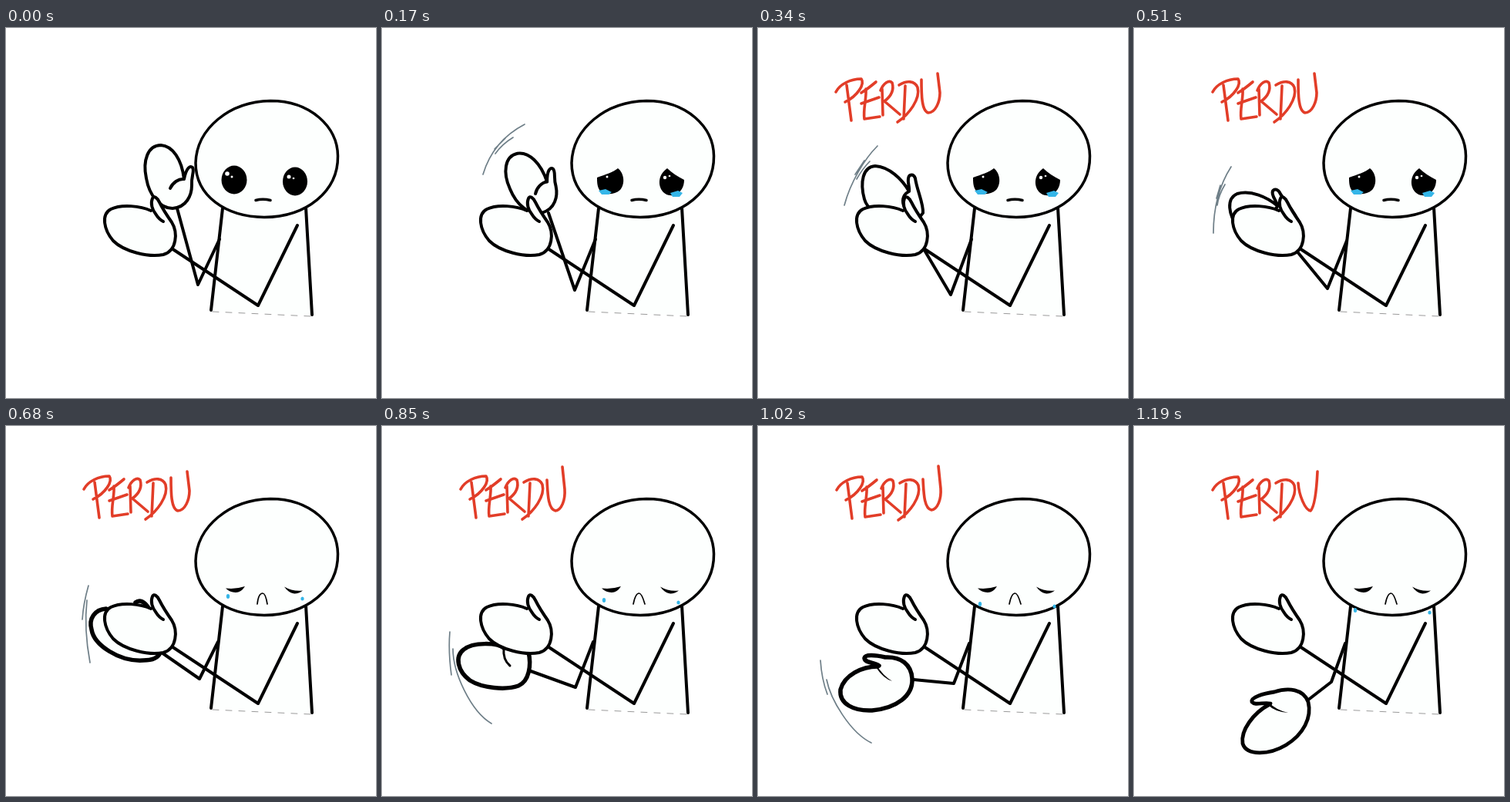
An HTML page without scripts for the animation above (1360 ms loop, 480 by 480 pixels).

```html
<!DOCTYPE html>
<html lang="fr">
<head>
<meta charset="utf-8">
<title>Perdu</title>
<style>
html, body { margin: 0; width: 100%; height: 100%; overflow: hidden; background: #fff; }
svg { display: block; width: 100%; height: 100%; }
path, ellipse { stroke-linecap: round; stroke-linejoin: round; }
.ink { fill: none; stroke: #000; stroke-width: 4; }
.skin { fill: #fdfffe; stroke: #000; stroke-width: 4; }
.bold { stroke-width: 5.5; }
.thin { stroke-width: 1.7; }
.speed { fill: none; stroke: #6f7f88; stroke-width: 1.7; }
.red { fill: none; stroke: #e23d28; stroke-width: 3.6; }
.tear { fill: #35b6e8; }
.light { fill: #fff; }

/* Each pose is held for one or more 170 ms steps; --i is its first step. */
.pose { visibility: hidden; animation: one 1360ms step-end calc(var(--i) * 170ms - 1360ms) infinite; }
.three { animation-name: three; }
.four { animation-name: four; }
@keyframes one { 0% { visibility: visible } 12.5%, 100% { visibility: hidden } }
@keyframes three { 0% { visibility: visible } 37.5%, 100% { visibility: hidden } }
@keyframes four { 0% { visibility: visible } 50%, 100% { visibility: hidden } }
</style>
</head>
<body>
<svg viewBox="0 0 480 480">
  <defs>
    <path id="handUp" class="skin" d="M231 196C228 170 216 153 201 152C184 152 177 172 182 195C186 218 200 234 216 234C234 233 241 217 241 204C240 192 245 186 242 181C239 178 234 181 231 196C224 195 216 201 213 208"/>
    <path id="handTilt" class="skin" d="M196 212C187 196 170 180 152 179C136 180 132 200 138 222C145 248 200 262 214 240C215 228 206 210 204 195C202 189 196 189 195 195C194 201 197 207 196 212C190 215 186 221 189 230"/>
    <path id="perd" class="red" d="M115 73L121 119M101 82C106 72 120 65 134 65C139 72 129 87 113 95M140 78C141 91 136 104 138 117L158 114M134 83C141 79 147 74 153 69M134 97L157 89M161 78L162 112M159 80C163 70 170 66 174 70C177 80 172 88 164 94L184 111M191 74L189 117M183 73C193 67 203 67 207 76C211 91 196 111 181 121"/>
    <path id="u" class="red" d="M213 67C213 85 213 108 222 110C231 110 237 96 237 84L234 59"/>
    <path id="tallU" class="red" d="M214 69C215 85 215 107 225 109C233 108 238 95 237 81L234 52"/>
    <g id="tears"><ellipse class="tear" cx="288" cy="221" rx="2.200" ry="3"/><ellipse class="tear" cx="384.500" cy="224" rx="2.200" ry="2.600"/></g>
  </defs>

  <!-- body -->
  <path fill="#fdfffe" d="M281 234L266 367L397 373L389 233Z"/>
  <path class="ink" d="M281 234L266 366M389 233L397 372"/>
  <path class="ink" style="stroke-width:.8;stroke-dasharray:8 9;opacity:.5" d="M268 368L396 374"/>

  <!-- far arm -->
  <g class="pose" style="--i:0">
    <path class="ink" d="M222 234L249 333L277 274"/>
    <use href="#handUp"/>
  </g>
  <g class="pose" style="--i:1">
    <path class="ink" d="M216 240L250 340L277 274"/>
    <use href="#handUp" transform="translate(-17 8) rotate(-12 210 193)"/>
    <path class="speed" d="M185 125C160 138 140 160 131 190M170 142C160 148 152 156 147 163M160 143L146 157"/>
  </g>
  <g class="pose" style="--i:2">
    <path class="ink" d="M214 285L250 346L277 274"/>
    <use href="#handTilt"/>
    <path class="speed" d="M155 153C138 170 120 200 112 230M145 173C138 180 132 189 128 196M138 172L126 190"/>
  </g>
  <g class="pose" style="--i:3">
    <path class="ink" d="M210 288L251 338L276 276"/>
    <use href="#handTilt" transform="translate(-7 27) rotate(-20 172 215)"/>
    <path class="speed" d="M126 180C110 205 103 235 103 266M118 203C112 213 109 222 108 230M112 204L107 221"/>
  </g>
  <g class="pose" style="--i:4">
    <path class="ink" d="M202 294L251 328L275 280"/>
    <path class="skin bold" d="M168 229C173 225 180 227 186 238L200 294C197 302 188 304 178 304C147 306 114 284 111 264C107 250 115 238 130 237"/>
    <path class="speed" d="M107 207C103 221 100 235 99 251M105 226C102 253 104 280 109 307"/>
  </g>
  <g class="pose" style="--i:5">
    <path class="ink" d="M193 318L251 339L274 280"/>
    <path class="skin bold" d="M158 288C150 281 118 280 106 290C94 299 98 318 114 330C130 340 160 343 177 337C191 331 194 310 190 293"/>
    <path class="ink" style="stroke-width:3" d="M158 288C157 298 160 306 166 311"/>
    <path class="speed" d="M88 267C86 290 88 308 90 323M92 289C92 320 115 370 142 386"/>
  </g>
  <g class="pose" style="--i:6">
    <path class="ink" d="M202 329L254 334L274 282"/>
    <path class="skin bold" d="M155 312C135 312 112 323 107 342C105 361 125 370 148 369C180 366 201 350 200 328C199 309 185 299 165 300C152 297 139 296 138 301C139 308 150 306 157 311"/>
    <path d="M153 309Q162 324 174 331Q163 328 153 313Z"/>
    <path class="speed" d="M81 304C82 320 85 335 90 348M89 329C94 355 120 398 147 411"/>
  </g>
  <g class="pose" style="--i:7">
    <path class="ink" d="M225 356L256 332L274 282"/>
    <path class="skin" style="stroke-width:4.800" d="M176 361C155 372 138 395 141 412C146 428 175 427 197 414C220 400 231 378 226 358C220 341 200 339 182 345C168 347 151 352 153 358C157 363 168 358 177 360"/>
    <path d="M174 358Q185 369 200 372Q183 371 174 362Z"/>
  </g>

  <!-- near arm -->
  <path class="ink" d="M378 256L327 360L215 286"/>
  <path class="skin" d="M188 237C175 231 150 228 136 235C123 242 127 262 139 276C153 290 185 298 204 294C222 289 223 265 215 252C208 242 204 236 199 226C196 220 192 217 190 221C187 228 190 236 194 241C197 246 200 249 204 251"/>

  <!-- head -->
  <path class="skin" style="stroke-width:3.500" d="M343 94.500C395 94.500 430 128 430.500 166C431 212 390 245 335 245.500C285 245 246 218 246 175C247.500 130 290 95.500 343 94.500Z"/>

  <!-- faces -->
  <g class="pose" style="--i:0">
    <ellipse cx="296" cy="197" rx="16.500" ry="18.500"/>
    <ellipse cx="375" cy="199" rx="16" ry="18.500"/>
    <g class="light"><circle cx="287" cy="189" r="2.800"/><circle cx="293" cy="193" r="1.500"/><circle cx="367" cy="193" r="2.500"/><circle cx="373" cy="195" r="1.300"/></g>
  </g>
  <g class="pose three" style="--i:1">
    <path d="M279 194C290 190 300 187 306 182C314 188 316 202 309 210C300 218 286 216 282 210C279 205 279 199 279 194ZM370 182C376 188 384 193 392 197C392 206 388 214 378 217C366 219 359 208 360 198C361 190 365 186 370 182Z"/>
    <g class="light"><circle cx="292" cy="193" r="1.500"/><circle cx="367" cy="194" r="2.200"/><circle cx="373" cy="192" r="1.300"/></g>
    <path class="tear" d="M281 211L290 209L298 213L294 216L285 216ZM374 214L384 211L390 214L386 219L377 219Z"/>
  </g>
  <g class="pose four" style="--i:0">
    <path class="ink" style="stroke-width:3.500" d="M324 223.500Q333 221 343 223.500"/>
  </g>
  <g class="pose four" style="--i:4">
    <path d="M285 210.500Q298 212 310 208Q305 216 298 216Q290 215.500 285 210.500ZM361 208.500Q372 215 385 213.500Q380 217.500 374 217.500Q366 216 361 208.500Z"/>
  </g>
  <path class="ink thin pose" style="--i:4" d="M326 231C327 221 330 217 333 217C336 217 338 225 339 231"/>
  <path class="ink thin pose three" style="--i:5" d="M326 231C328 221 331 217 333.500 217C336.500 217 339 224 341 231"/>
  <use class="pose" style="--i:4" href="#tears"/>
  <use class="pose" style="--i:5" href="#tears" y="5"/>
  <use class="pose" style="--i:6" href="#tears" y="10"/>
  <use class="pose" style="--i:7" href="#tears" x="-1" y="18"/>

  <!-- shaky lettering -->
  <g class="pose" style="--i:2">
    <use href="#perd" y="1"/>
    <use href="#u" x="-1"/>
  </g>
  <g class="pose" style="--i:3">
    <use href="#perd" x="1" y="1"/>
    <use href="#u"/>
  </g>
  <g class="pose" style="--i:4">
    <use href="#perd"/>
    <use href="#u" x="1"/>
  </g>
  <g class="pose" style="--i:5">
    <use href="#perd" x="1"/>
    <use href="#tallU" y="1"/>
  </g>
  <g class="pose" style="--i:6">
    <use href="#perd" x="1" y="1"/>
    <use href="#tallU"/>
  </g>
  <g class="pose" style="--i:7">
    <use href="#perd" x="1" y="1"/>
    <path class="red" d="M213 74C214 90 222 109 229 110C235 104 237 80 238 59"/>
  </g>
</svg>
</body>
</html>
```
